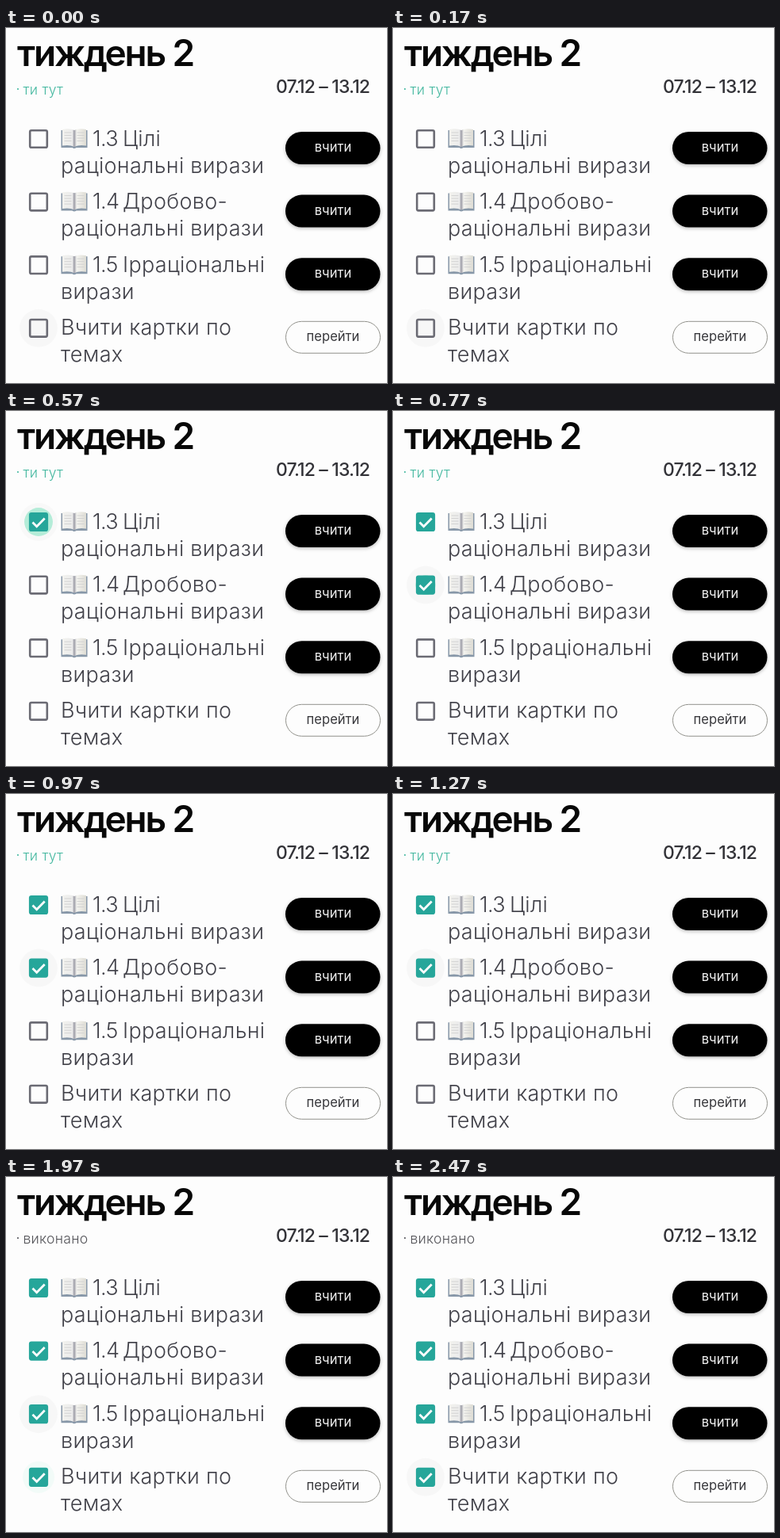
An HTML page for the animation above (2.51 s loop, 480x448 px).

```html
<!DOCTYPE html>
<html lang="uk">
<head>
<meta charset="utf-8">
<title>Тиждень 2</title>
<style>
html, body { margin: 0; width: 100%; height: 100%; overflow: hidden; background: #fdfdfd; }
svg { display: block; font-family: Inter, "Open Sans", sans-serif; fill: #414149; }
.title { font-size: 46px; font-weight: 600; letter-spacing: -2.15px; fill: #080808; }
.dates { font-size: 23px; font-weight: 500; letter-spacing: -.85px; fill: #333338; }
.status { font-size: 17.6px; font-weight: 300; letter-spacing: .25px; }
.task { font-size: 27px; font-weight: 300; letter-spacing: .3px; }
.num { letter-spacing: -.6px; }
.label { font-size: 16.6px; text-anchor: middle; }
.shadow { filter: blur(2px); }
</style>
</head>
<body>
<svg id="stage" width="480" height="448" viewBox="0 0 480 448">
  <defs>
    <linearGradient id="page">
      <stop offset="0" stop-color="#f2f2ee"/>
      <stop offset=".42" stop-color="#ececec"/>
      <stop offset=".5" stop-color="#9c9ca6"/>
      <stop offset=".6" stop-color="#f4f4f0"/>
      <stop offset="1" stop-color="#dedcd4"/>
    </linearGradient>
    <g id="book">
      <path d="M0 2H33V24H19Q16.5 26 14 24H0Z" fill="#8797a8"/>
      <path d="M1.5 1Q11 -1 16.5 2Q22 -1 31.5 1V21.5Q22 20 16.5 23Q11 20 1.5 21.5Z" fill="url(#page)"/>
      <path d="M4 5H13M4 8.5H13M4 12H13M4 15.5H13M20 5H29M20 8.5H29M20 12H29M20 15.5H29" stroke="#d2d2d2"/>
    </g>
  </defs>
  <text class="title" x="14" y="48">тиждень 2</text>
  <text class="dates" x="340" y="82">07.12 – 13.12</text>
  <circle id="dot" cx="15" cy="77" r="1.1"/>
  <text id="status" class="status" x="21.5" y="84"></text>
</svg>
<script>
const LOOP = 2510, PITCH = 79.6, DONE = 1770;
const tasks = [
  ['1.3', 'Цілі', 'раціональні вирази'],
  ['1.4', 'Дробово-', 'раціональні вирази'],
  ['1.5', 'Ірраціональні', 'вирази'],
  ['', 'Вчити картки по', 'темах']
];
const clicks = [480, 730, 1470, DONE];
// row, pointer enters, pointer leaves
const hovers = [[3, -200, 400], [0, 420, 640], [1, 670, 1380], [2, 1410, 1680],
  [3, 1710, 1850], [2, 1880, 2130], [3, 2180, 2900]];

const stage = document.getElementById('stage');
const status = document.getElementById('status');
const dot = document.getElementById('dot');
const clamp = v => Math.max(0, Math.min(1, v));

function add(parent, tag, attrs, text = '') {
  const el = document.createElementNS('http://www.w3.org/2000/svg', tag);
  for (const key in attrs) el.setAttribute(key, attrs[key]);
  el.textContent = text;
  parent.append(el);
  return el;
}

function addButton(row, solid) {
  const pill = { x: 352, y: -9, width: 119.5, height: 41, rx: 20.5 };
  if (solid) {
    add(row, 'rect', { ...pill, y: -7.5, fill: '#777', opacity: .5, class: 'shadow' });
    add(row, 'rect', { ...pill, fill: '#000' });
  } else {
    add(row, 'rect', { ...pill, x: 352.5, y: -8.5, width: 119, height: 40, rx: 20, fill: 'none', stroke: '#92928c' });
  }
  add(row, 'text', { class: 'label', x: 412, y: 16, fill: solid ? '#f0f0f0' : '#38383c' },
    solid ? 'вчити' : 'перейти');
}

const rows = tasks.map(([num, first, second], i) => {
  const row = add(stage, 'g', { transform: `translate(0 ${140 + i * PITCH})` });
  const halo = add(row, 'circle', { cx: 41, r: 24, fill: '#000' });
  const ripple = add(row, 'circle', { cx: 41, fill: '#3fd5a0' });
  const box = add(row, 'rect', { x: 30.2, y: -10.8, width: 21.6, height: 21.6, rx: 1.8, 'stroke-width': 2.6 });
  const tick = add(row, 'path', { d: 'M33.5 .5L38.7 5.7L48.7 -4.6', fill: 'none', stroke: '#fdfdfd', 'stroke-width': 2.8 });
  if (num) {
    add(row, 'use', { href: '#book', x: 69.5, y: -13 });
    add(row, 'text', { class: 'task num', x: 109, y: 8.5 }, num);
  }
  add(row, 'text', { class: 'task', x: num ? 147 : 69, y: 8.5 }, first);
  add(row, 'text', { class: 'task', x: 69, y: 42.5 }, second);
  addButton(row, num);
  return { halo, ripple, box, tick };
});

function draw(t) {
  rows.forEach(({ halo, ripple, box, tick }, i) => {
    const age = t - clicks[i], on = age >= 0;
    let glow = 0;
    for (const [row, from, to] of hovers) {
      if (row === i) glow = Math.max(glow, clamp((t - from) / 80) * clamp((to - t) / 80));
    }
    halo.setAttribute('opacity', glow * .022);
    ripple.setAttribute('r', 8 + 12 * clamp(age / 110));
    ripple.setAttribute('opacity', on ? .4 * clamp((220 - age) / 140) : 0);
    box.setAttribute('fill', on ? '#26a69a' : 'none');
    box.setAttribute('stroke', on ? '#26a69a' : '#6b6b74');
    tick.setAttribute('opacity', on ? 1 : 0);
  });
  const done = t >= DONE, color = done ? '#55555a' : '#45b8a0';
  status.textContent = done ? 'виконано' : 'ти тут';
  status.setAttribute('fill', color);
  dot.setAttribute('fill', color);
}

const start = performance.now();
function tick() {
  draw((performance.now() - start) % LOOP);
  requestAnimationFrame(tick);
}
tick();
</script>
</body>
</html>
```
